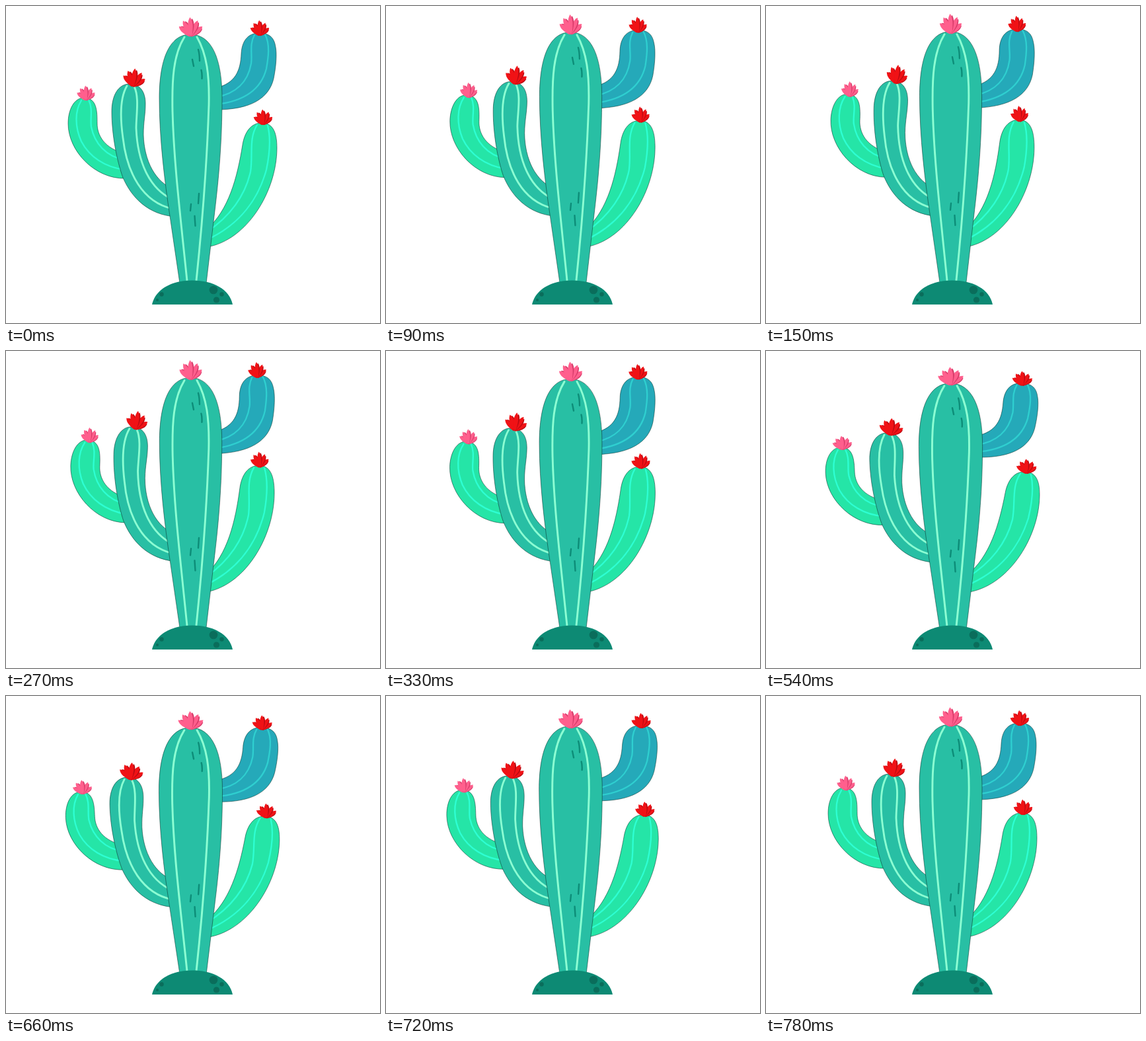
Animation, 566 px wide and 480 px high, one loop 0.81 s. Source, as an HTML page:

```html
<!DOCTYPE html>
<html lang="en">
<head>
<meta charset="utf-8">
<title>Dancing cactus</title>
<style>
  html, body { margin: 0; width: 100%; height: 100%; overflow: hidden; background: #fff; }
  svg { display: block; width: 566px; height: 480px; }
  .line { fill: none; stroke-linecap: round; }
  .skin { stroke: #08302a; stroke-opacity: .6; stroke-width: .9; }
</style>
</head>
<body>
<svg id="stage" viewBox="0 0 566 480"></svg>
<script>
const LOOP = 810, SWAY = 780, STEP = 30, GROUND = 416;
const MINT = '#8cffd3', AQUA = '#2effd3';
const RED = ['#f01216', '#b80a12'], PINK = ['#ff5f8d', '#d63b69'];

// swing: radians of sway around the pivot; bloom: x, y, scale, tilt, colours
const arms = [
  { pivot: [180, 275], swing: .045, fill: '#25e5a7', ink: AQUA, width: 2.3,
    skin: 'M118 139C103 139 94 157 94 178C94 220 135 262 180 261L182 224C148 216 138 195 138 178C138 160 138 139 118 139Z',
    lines: ['M114 143C104 159 104 183 114 205C126 228 149 244 180 248',
            'M125 142C132 156 127 171 129 183C134 208 151 228 180 233'],
    bloom: [121, 142, .77, 0, PINK] },
  { pivot: [245, 300], swing: .025, fill: '#28bfa4', ink: MINT, width: 2.8,
    skin: 'M187 118C170 118 160 135 160 160C160 195 168 235 177 260C190 290 215 316 256 319L256 278C226 268 209 234 208 195C208 175 211 165 211 148C211 130 203 118 187 118Z',
    lines: ['M183 121C173 138 172 165 177 200C183 252 206 297 252 307',
            'M194 122C202 138 197 165 197 185C199 235 216 276 252 293'],
    bloom: [192, 121, .95, 9, RED] },
  { pivot: [325, 165], swing: -.034, fill: '#25a9b9', ink: '#2fcfd0', width: 2.3,
    skin: 'M383 41C366 41 357 53 356 72C355 98 347 117 318 124L318 157C370 157 398 140 405 110C409 90 410 72 408 62C406 48 399 41 383 41Z',
    lines: ['M376 44C368 58 373 73 371 87C366 116 347 133 318 138',
            'M392 43C400 58 397 78 394 95C385 130 354 145 318 149'],
    bloom: [384, 44, .8, 0, RED] },
  { pivot: [312, 365], swing: -.03, fill: '#25e5a7', ink: AQUA, width: 2.3,
    skin: 'M387 177C370 177 361 192 358 210C350 260 337 309 304 338L304 365C365 355 410 280 410 215C410 195 406 177 387 177Z',
    lines: ['M380 180C367 201 374 225 370 251C362 287 339 319 304 342',
            'M396 181C401 200 399 224 394 248C382 292 354 331 304 354'],
    bloom: [389, 179, .8, 0, RED] }
];

const body = 'M263 420L248 318C240 265 232 200 232 140C232 81 247 43 279 43C312 43 327 81 327 140C327 205 322 260 316 310L303 420Z';
const ribs = ['M270 47C253 74 251 112 252 160C254 235 263 310 274 416',
              'M289 47C304 73 308 105 307 150C304 240 298 320 288 416'];
const dashes = 'M291 66Q293 73 293 83M282 81L284 91M295.5 97Q297 102 296.5 110' +
               'M292 284L291 299M280 300L279 310M285.5 318L286.5 333';

function add(parent, tag, attrs = {}) {
  const el = document.createElementNS('http://www.w3.org/2000/svg', tag);
  for (const key in attrs) el.setAttribute(key, attrs[key]);
  return parent.appendChild(el);
}

function strokes(parent, paths, stroke, width) {
  for (const d of paths) add(parent, 'path', { d, stroke, 'stroke-width': width, class: 'line' });
}

function petal(parent, angle, len, fill) {
  add(parent, 'path', {
    d: `M-2 0C-4 ${-len * .4} -5.2 ${-len * .75} 0 ${-len}C5.2 ${-len * .75} 4 ${-len * .4} 2 0Z`,
    fill, transform: `rotate(${angle})`
  });
}

const blooms = [];
function bloom(parent, [x, y, scale, tilt, [light, dark]]) {
  const spot = add(parent, 'g', { transform: `translate(${x} ${y}) rotate(${tilt}) scale(${scale})` });
  const g = add(spot, 'g');
  add(g, 'ellipse', { cx: 0, cy: -4, rx: 8, ry: 5, fill: light });
  for (const [angle, len] of [[-52, 22.5], [52, 22.5], [-27, 25.5], [25, 25.5], [-2, 28]]) {
    petal(g, angle + 7, len - 2, dark);
    petal(g, angle, len, light);
  }
  blooms.push(g);
}

const stage = document.getElementById('stage');
const plant = add(stage, 'g');
for (const arm of arms) {
  arm.el = add(plant, 'g');
  add(arm.el, 'path', { d: arm.skin, fill: arm.fill, class: 'skin' });
  strokes(arm.el, arm.lines, arm.ink, arm.width);
  bloom(arm.el, arm.bloom);
}
const stem = add(plant, 'g');
add(stem, 'path', { d: body, fill: '#28bfa4', class: 'skin' });
strokes(stem, ribs, MINT, 2.9);
strokes(stem, [dashes], '#0d8d78', 2.4);
bloom(stem, [279.5, 45, 1, 0, PINK]);

add(stage, 'path', { d: 'M221 452C226 429 250 415.5 282 415.5C314 415.5 338 429 343 452Z', fill: '#0d8a74' });
for (const [cx, cy, r] of [[314, 430, 6.3], [326.5, 436.5, 3.2], [318.5, 445, 4.6], [235.5, 436.5, 3.2], [229, 445, 2]])
  add(stage, 'circle', { cx, cy, r, fill: '#0a6d5b' });

// Cosine wave from +1 at `high` to -1 at `low` and back
function wave(t, high, low) {
  const u = (t - high + SWAY) % SWAY, fall = low - high;
  return Math.cos(Math.PI * (u < fall ? u / fall : 1 + (u - fall) / (SWAY - fall)));
}

// Half a sine inwards until `turn`, then half a sine outwards
function lean(t, turn) {
  return t < turn ? Math.sin(Math.PI * t / turn) : -Math.sin(Math.PI * (t - turn) / (SWAY - turn));
}

function draw() {
  const step = Math.floor((performance.now() + 1) / STEP) * STEP;
  const t = Math.min(step % LOOP, SWAY);
  const stretch = wave(t, 160, 580) - wave(0, 160, 580);
  const sway = lean(t, 410);

  const sy = 1 + .0138 * stretch;
  plant.setAttribute('transform', `translate(0 ${GROUND * (1 - sy)}) scale(1 ${sy})`);
  const sx = 1 - .012 * stretch;
  stem.setAttribute('transform', `translate(${280 * (1 - sx)} 0) scale(${sx} 1)`);
  for (const { el, pivot, swing } of arms)
    el.setAttribute('transform', `rotate(${swing * sway * 180 / Math.PI} ${pivot})`);
  for (const g of blooms)
    g.setAttribute('transform', `scale(${1 - .065 * stretch} ${1 + .035 * stretch})`);
  requestAnimationFrame(draw);
}
draw();
</script>
</body>
</html>
```
